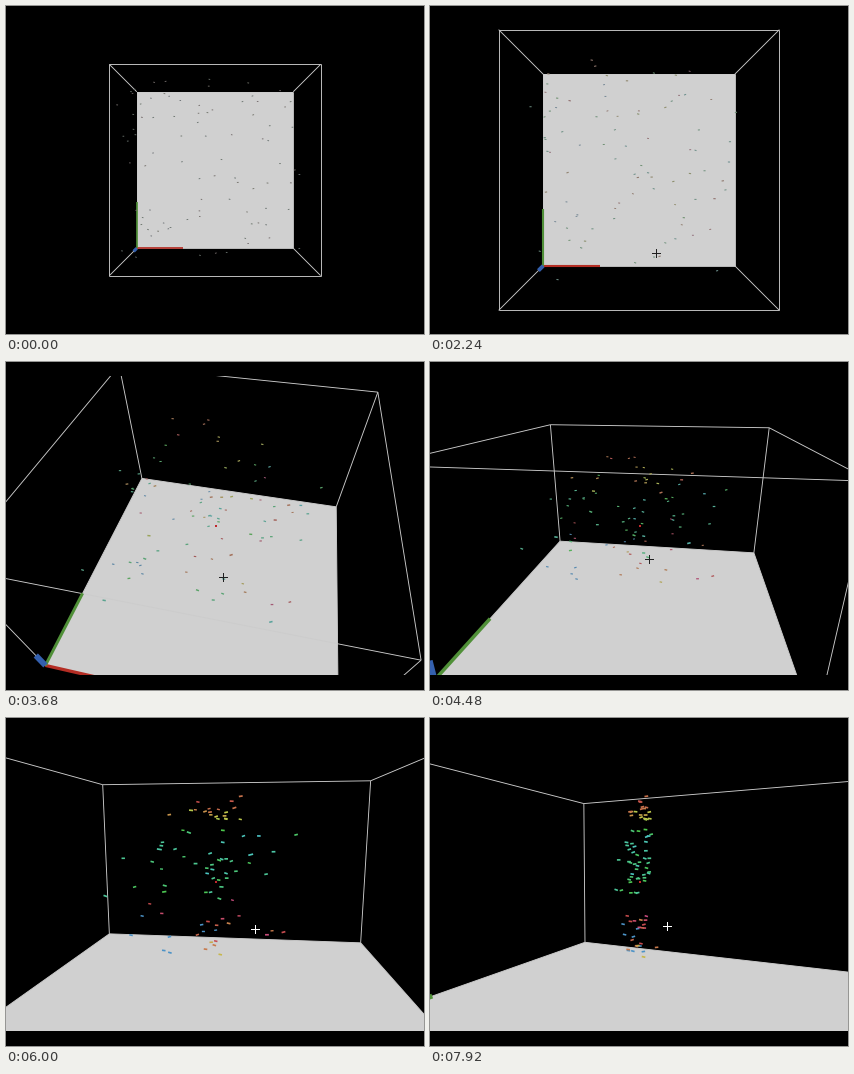
Write a matplotlib script that moves like this. It is 418 px wide and 328 px high and loops after 8000 ms.

```python
import colorsys
from itertools import product

import matplotlib.pyplot as plt
import numpy as np
from matplotlib.animation import FuncAnimation
from matplotlib.collections import LineCollection
from matplotlib.patches import Polygon, Rectangle
from matplotlib.path import Path

W, H, DPI = 418, 328, 100
FRAMES, INTERVAL = 100, 80
PX = 72 / DPI
FOCAL = 362
CENTER = np.array([209.0, 164.0])
HALF = np.array([0.5, 0.5, 0.3])
COUNT = 86

# Camera and pointer keys: time in seconds, then value
DISTANCE = [(1.6, 2.014), (2.8, 1.292), (5.04, 1.292), (5.7, 0.905),
            (7.92, 0.9)]
TILT = [(3.0, 0), (3.68, 41), (4.16, 60), (4.48, 69.4), (5.7, 69.8),
        (6.0, 81.5), (7.92, 86.9)]
TURN = [(3.0, 0), (3.68, 12), (4.48, 8.5), (5.7, 8), (6.0, 6.8),
        (6.3, 7), (7.92, 25.5)]
POINTER = [(1.36, 42, 238), (1.44, 122, 232), (1.7, 225, 246),
           (3.0, 225, 246), (3.68, 216, 214), (4.48, 218, 196),
           (5.0, 218, 196), (5.6, 246, 219), (6.0, 248, 210),
           (7.92, 236, 207)]


def track(keys, t, column=1):
    return np.interp(t, [k[0] for k in keys], [k[column] for k in keys])


def project(points, t):
    """Return stage positions and depths of points seen at time t."""
    x, y, z = np.asarray(points, float).T
    turn, tilt = np.radians(track(TURN, t)), np.radians(track(TILT, t))
    dist = np.exp(track([(k, np.log(d)) for k, d in DISTANCE], t))
    right = x * np.cos(turn) + y * np.sin(turn)
    back = y * np.cos(turn) - x * np.sin(turn)
    up = back * np.cos(tilt) + z * np.sin(tilt)
    depth = np.maximum(dist + back * np.sin(tilt) - z * np.cos(tilt), 0.05)
    return CENTER + FOCAL * np.c_[right, -up] / depth[:, None], depth


corners = np.array(list(product((-1, 1), repeat=3))) * HALF
edges = [(a, b) for a in range(8) for b in range(a + 1, 8)
         if np.sum(corners[a] != corners[b]) == 1]
floor_ids = [0, 2, 6, 4]
axis_tips = corners[0] + np.diag([0.294, 0.294, 0.09])
axis_width = np.array([0.011, 0.011, 0.02])

rng = np.random.default_rng(12)
start = rng.uniform(-0.5, 0.5, (COUNT, 2))
radius0 = np.hypot(*start.T)
angle0 = np.arctan2(start[:, 1], start[:, 0])
spin = rng.uniform(-0.12, 0.12, COUNT)
core = 0.03 * np.sqrt(rng.random(COUNT))
height = np.where(rng.random(COUNT) < 0.66, rng.uniform(-0.03, 0.21, COUNT),
                  rng.uniform(-0.19, -0.09, COUNT))
slant = rng.uniform(-0.35, 0.35, COUNT)
hue = np.interp(height, [-0.19, -0.16, -0.13, -0.09, -0.02, 0.12, 0.17, 0.21],
                [0.15, 0.06, 0.0, -0.03, 0.4, 0.45, 0.1, 0.0])
hue += rng.normal(0, 0.04, COUNT)
hue[(height < -0.11) & (start[:, 0] < -0.2)] = 0.57


def swarm(t):
    pull = 0.5 * (t / 7.9) ** 1.5 * np.maximum(1, radius0 / 0.55)
    r = np.maximum(radius0 - pull, core)
    angle = angle0 + spin * t
    return np.c_[r * np.cos(angle), r * np.sin(angle), height]


def swarm_colors(t):
    sat = np.interp(t, [0, 1.6, 3, 6], [0.08, 0.1, 0.4, 0.62])
    value = np.interp(t, [0, 3, 6], [0.45, 0.6, 0.78])
    return [colorsys.hsv_to_rgb(h % 1, sat, value) for h in hue]


fig = plt.figure(figsize=(W / DPI, H / DPI), dpi=DPI, facecolor="black")
ax = fig.add_axes([0, 0, 1, 1])
ax.set(xlim=(0, W), ylim=(H, 0))
ax.axis("off")

floor = ax.add_patch(Polygon(np.zeros((4, 2)), fc="#d0d0d0", lw=0, zorder=1))


def lines(zorder, **style):
    return ax.add_collection(LineCollection([], zorder=zorder, **style),
                             autolim=False)


box = lines(2, colors="#cccccc", linewidths=0.9 * PX)
axes_lines = lines(3, colors=["#b42d24", "#509038", "#3460ae"],
                   capstyle="butt")
particles = lines(4, capstyle="butt")
target, = ax.plot([], [], "s", color="#c0282c", ms=2 * PX, mew=0, zorder=5)
pointer = lines(6, linewidths=PX, capstyle="butt", antialiaseds=False)
for top, tall in ((0, 14), (313.3, H)):
    ax.add_patch(Rectangle((0, top), W, tall, fc="black", lw=0, zorder=9))


def update(frame):
    t = frame * INTERVAL / 1000
    pts, depth = project(corners, t)
    floor.set_xy(pts[floor_ids])
    box.set_segments([pts[list(e)] for e in edges])

    tips, tip_depth = project(axis_tips, t)
    axes_lines.set_segments([[pts[0], tip] for tip in tips])
    middle = (tip_depth + depth[0]) / 2
    axes_lines.set_linewidths(axis_width * FOCAL / middle * PX)

    spots, spot_depth = project(swarm(t), t)
    size = FOCAL / spot_depth
    dash = 0.0045 * size[:, None] * np.c_[np.cos(slant), np.sin(slant)]
    particles.set_segments(np.stack([spots - dash, spots + dash], axis=1))
    particles.set_linewidths(np.clip(0.0042 * size, 0.9, 1.7) * PX)
    particles.set_color(swarm_colors(t))
    target.set_data(*(([209.5], [163.5]) if t >= 2.4 else ([], [])))

    x, y = (track(POINTER, t, c) + 0.5 for c in (1, 2))
    pointer.set_visible(t >= 1.35)
    pointer.set_segments([[(x - 4, y), (x + 4, y)], [(x, y - 4), (x, y + 4)]])
    on_floor = Path(pts[floor_ids]).contains_point((x, y))
    pointer.set_color("#202020" if on_floor else "white")
    return floor, box, axes_lines, particles, target, pointer


anim = FuncAnimation(fig, update, frames=FRAMES, interval=INTERVAL,
                     repeat=True, repeat_delay=0, blit=False)
plt.show()
```
